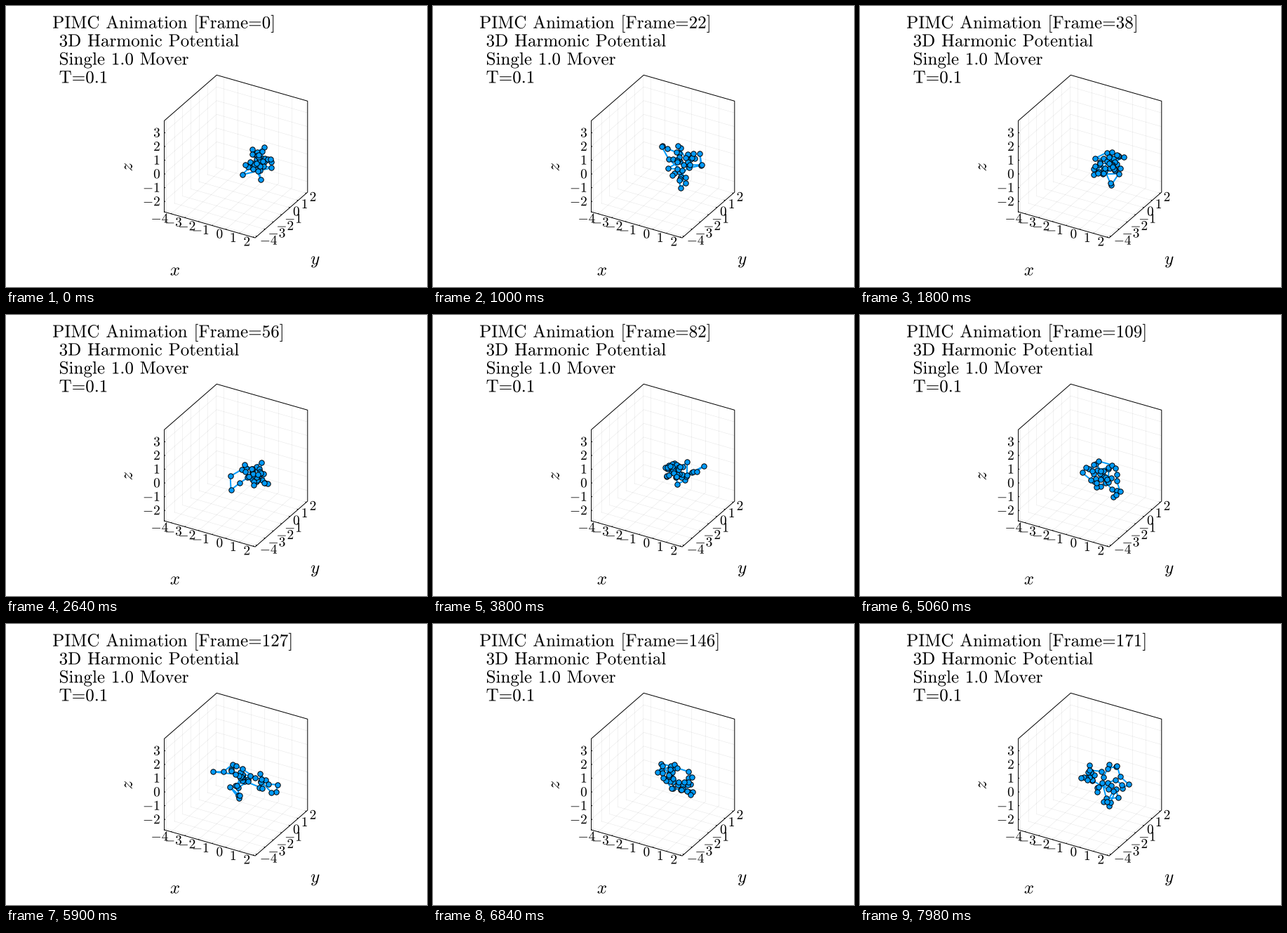
Recreate the animation shown at these times as a matplotlib script. Size 600 by 400 pixels, loop 8 s.

```python
import numpy as np
import matplotlib.pyplot as plt
from matplotlib.animation import FuncAnimation
from matplotlib.collections import LineCollection
from matplotlib.patches import PathPatch
from matplotlib.textpath import TextPath
from matplotlib.transforms import Affine2D

plt.rcParams["mathtext.fontset"] = "cm"

W, H, DPI = 600, 400, 100
PX = 72 / DPI                      # one pixel in points
BIG, SMALL = 25.1, 19.4            # letter sizes in pixels
BLUE = "#009afa"
STEPS = 172

fig = plt.figure(figsize=(W / DPI, H / DPI), dpi=DPI, facecolor="white")
ax = fig.add_axes([0, 0, 1, 1])
ax.set_xlim(0, W)
ax.set_ylim(H, 0)
ax.axis("off")


# ---- text ----
def roman(text):
    text = text.replace(" ", r"\hspace{0.4}")
    text = text.replace("=", r"\hspace{-0.2}=\hspace{-0.2}")
    return r"$\mathrm{%s}$" % text


def glyphs(text, size):
    return TextPath((0, 0), text, size=size)


def label(x, y, text, size=BIG, turn=0):
    place = Affine2D().scale(1, -1).rotate_deg(-turn).translate(x, y)
    patch = PathPatch(glyphs(text, size), fc="black", lw=0,
                      transform=place + ax.transData)
    return ax.add_patch(patch)


def heading(n):
    return roman(f"PIMC Animation [Frame={n}]")


title = label(66.2, 31.6, heading(0))
for row, text in enumerate(["3D Harmonic Potential", "Single 1.0 Mover", "T=0.1"]):
    label(75.6, 57.6 + 26 * row, roman(text))
label(233.8, 383.5, "$x$")
label(434.1, 367.5, "$y$")
label(180, 235.5, "$z$", turn=90)


def tick_label(x, y, v, right):
    if right:
        x -= SMALL * (1.278 if v < 0 else 0.5)
    label(x, y + 6.4, f"${v}$", SMALL)


# ---- box ----
LO = np.array([-4.5, -4.2, -2.77])
HI = np.array([2.15, 2.15, 3.86])
CORNER = np.array([225.6, 293])
EDGES = np.array([[129.5, 37], [74.7, -65], [0, -129.7]])


def project(p):
    return CORNER + (np.asarray(p) - LO) / (HI - LO) @ EDGES


def at(axis, v, other, end):
    """Point on the low corner's axis at v, moved along another axis."""
    p = LO.copy()
    p[axis] = v
    p[other] += end * (HI - LO)[other]
    return p


grid, ticks = [], []
for axis, values in enumerate([range(-4, 3), range(-4, 3), range(-2, 4)]):
    for v in values:
        for other in {0, 1, 2} - {axis}:
            # walls are x = low, y = high and z = low
            a, b = at(axis, v, other, 0), at(axis, v, other, 1)
            if axis != 1 and other != 1:
                a[1] = b[1] = HI[1]
            grid.append([project(a), project(b)])
        if axis == 0:
            a, b = at(0, v, 1, 0), at(0, v, 1, 0.012)
            tick_label(309.2 + 19.45 * v, 324 + 5.53 * v, v, True)
        elif axis == 1:
            a, b = at(1, v, 0, 1), at(1, v, 0, 0.988)
            tick_label(409 + 11.8 * v, 292 - 10.3 * v, v, False)
        else:
            a, b = at(2, v, 0, 0), at(2, v, 0, 0.012)
            tick_label(219.8, 238.8 - 19.55 * v, v, True)
        ticks.append([project(a), project(b)])

ax.add_collection(LineCollection(grid, colors="black", alpha=0.1, lw=0.5 * PX))
ax.add_collection(LineCollection(ticks, colors="black", lw=PX))

left, right = CORNER, CORNER + EDGES[0] + EDGES[1]
frame = [left, left + EDGES[0], right, right + EDGES[2],
         left + EDGES[1] + EDGES[2], left + EDGES[2], left]
ax.plot(*np.transpose(frame), color="black", lw=PX, solid_joinstyle="miter")

# ---- ring of beads ----
BEADS = 40
LINK = 0.4                         # spread of a bead between its neighbours
PULL = 0.1                         # strength of the trap
HUBS = np.array([(0.4, 0.2, 0.8), (-0.5, 0, -1.2), (-1.9, -1.2, -0.1)])


def simulate():
    """A tight cloud relaxes into a wide ring, one random bead at a time."""
    rng = np.random.default_rng(7)
    loop = np.vstack([HUBS, HUBS[:1]])
    turn = np.linspace(0, len(HUBS), BEADS, endpoint=False)
    spine = np.column_stack([np.interp(turn, range(len(loop)), c)
                             for c in loop.T])
    beads = rng.normal(scale=0.5, size=(BEADS, 3))
    path = [project(beads)]
    for n in range(1, STEPS):
        growth = 1 - np.exp(-n / 30)
        for i in rng.integers(BEADS, size=BEADS // 2):
            pulled = beads[i - 1] + beads[(i + 1) % BEADS] + PULL * growth * spine[i]
            kick = rng.normal(scale=LINK / np.sqrt(2 + PULL), size=3)
            beads[i] = pulled / (2 + PULL) + kick
        path.append(project(beads))
    return path


path = simulate()
line, = ax.plot([], [], color=BLUE, lw=2 * PX, zorder=5)
dots, = ax.plot([], [], "o", ms=7.4 * PX, mfc=BLUE, mec="black",
                mew=PX, zorder=6)


def step_at(tick):
    """Steps last 20, 100 and 20 ms in turn; a tick is 20 ms."""
    turn, rest = divmod(tick, 7)
    return 3 * turn + (rest > 0) + (rest > 5)


def update(tick):
    n = step_at(tick)
    ring = path[n]
    line.set_data(*np.vstack([ring, ring[:1]]).T)
    dots.set_data(*ring.T)
    title.set_path(glyphs(heading(n), BIG))
    return line, dots, title


anim = FuncAnimation(fig, update, frames=400, interval=20, repeat=True,
                     repeat_delay=0)
plt.show()
```
